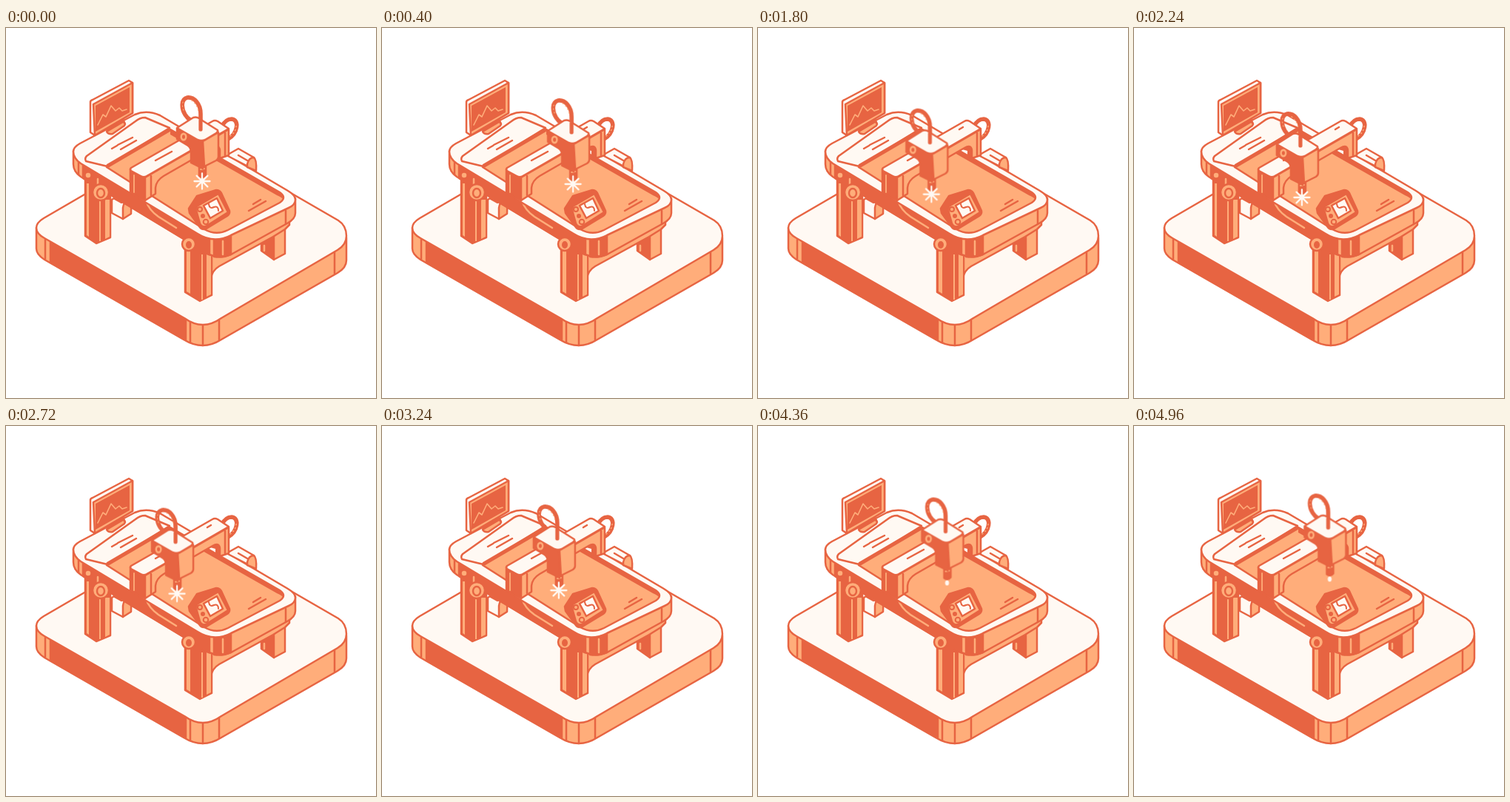
These frames come from a looping animation (500x500 px, 5000 ms). An HTML page:

```html
<!DOCTYPE html>
<html lang="en">
<head>
<meta charset="utf-8">
<title>Laser cutter</title>
<style>
  html, body { margin: 0; width: 100%; height: 100%; overflow: hidden; background: #fff; }
  svg { display: block; width: 100vw; height: 100vh; }
  path, circle, ellipse { stroke: #e76442; stroke-width: 2.5; stroke-linejoin: round; stroke-linecap: round; }
  .w { fill: #fff9f3; }
  .o { fill: #ffad7a; }
  .d { fill: #e76442; }
  .l { fill: none; }
  .lo { fill: none; stroke: #ffad7a; }
  .n { stroke: none; }
  .hose { fill: none; stroke-width: 5.6; }
  .rays { fill: none; stroke: #fff9f3; stroke-width: 2.3; }
  #head { animation: travel 5s linear infinite; }
  #spark { animation: flash .2s step-end infinite; }
  @keyframes travel {
    0%, 100% { transform: translate(0, 0); }
    46.667% { transform: translate(-39.7px, 22.9px); }
  }
  @keyframes flash {
    0% { opacity: 1; }
    80% { opacity: 0; }
  }
</style>
</head>
<body>
<svg viewBox="0 0 500 500">
  <g id="platform">
    <path class="o" d="M41 270V298Q41 306 52 313L240 421Q266 437 291 421L448 331Q460 324 460 314V283L266 200Z"/>
    <path class="d" d="M60 289L243 394V422L60 317Z"/>
    <path class="l" d="M53 286V312M249 397V425M266 402V429M288 395V422M444 303V332"/>
    <path class="w" d="M51 257L235 150Q246 143 257 149L449 260Q460 267 460 281Q460 293 448 300L291 392Q266 410 241 392L52 284Q41 278 41 270Q41 263 51 257Z"/>
  </g>

  <g id="legs">
    <path class="d" d="M345 286V301L362 313V270Z"/>
    <path class="o" d="M362 276L377 266V305L362 313Z"/>
    <path class="lo" d="M349 294V301" stroke-width="2"/>
    <path class="o" d="M270 306L383 258V266L377 272L361 282L288 322Q278 328 277 339Z"/>
    <path class="w" d="M143 232L152 226L165 232L158 258L143 250Z"/>
    <path class="o" d="M158 258V243Q159 234 166 233Q170 236 169 251Z"/>
    <path class="l" d="M147 231L156 236"/>
    <path class="d" d="M107 200V281L122 291L141 283V215Z"/>
    <path class="o n" d="M109 210H112V282L109 280ZM126 232H128V288H126ZM134 232H140V282L134 285Z"/>
    <path class="d" d="M242 286V357L262 369L278 361V296Z"/>
    <path class="o n" d="M244 300H249V359L244 356ZM264 306H266V367H264ZM271 306H277V360L271 363Z"/>
  </g>

  <g id="table">
    <path class="o" d="M91 166V184Q91 194 101 201L258 296Q281 316 306 305L380 264Q391 258 391 250V230L240 150Z"/>
    <path class="d" d="M104 184L259 278L275 285V306Q266 303 258 296L104 203Z"/>
    <path class="d" d="M281 287Q294 287 304 280V306Q293 311 281 309Z"/>
    <path class="l" d="M98 180V198M378 247V265"/>
    <path class="lo" d="M293 288V306M189 233Q193 246 206 255L230 270"/>
    <path class="w" d="M100 156L174 117Q190 110 208 118L381 220Q391 226 391 232Q391 239 382 243L304 280Q281 292 259 278L101 183Q91 176 91 167Q91 161 100 156Z"/>
    <path class="o" d="M136 188L222 137L370 222Q380 229 370 236L300 273Q284 281 268 272Z"/>
    <path class="d n" d="M222 136L370 222Q378 227 375 232Q373 229 366 226L222 144Z"/>
    <path class="w" d="M109 173L175 126Q181 121 188 121L221 135L137 187L108 180Q106 176 109 173Z"/>
    <path class="l" d="M138 186L220 138" stroke-width="2" style="stroke-width:5"/>
    <path class="l" d="M151 158L171 148M143 163L150 159M155 164L176 152M334 238L344 232M328 247L351 234"/>
    <circle class="o" cx="111" cy="199" r="4.5"/>
    <path class="lo" d="M124 204V212"/>
    <circle class="o" cx="128" cy="222" r="11"/>
    <ellipse class="o" cx="128" cy="223" rx="5" ry="6"/>
    <circle class="o" cx="247" cy="292" r="9"/>
    <ellipse class="d n" cx="247" cy="293" rx="4" ry="5"/>
  </g>

  <g id="monitor">
    <path class="d" d="M135 137L158 123L161 130L143 142Z"/>
    <path class="o" d="M136 140L158 127Q162 128 160 132L144 143Q138 144 136 140Z"/>
    <path class="w" d="M114 100Q114 98 117 97L166 71L171 74V115L120 145L114 141Z"/>
    <path class="o" d="M118 103L171 74V115L120 145Z"/>
    <path class="d n" d="M121 105L167 80V114L121 140Z"/>
    <path class="lo" d="M124 131L131 117L135 120L142 105L148 112L153 108L157 112L163 110" style="stroke-width:1.6"/>
  </g>

  <g id="motor">
    <path class="w" d="M298 172L314 163L335 175L327 187Z"/>
    <path class="o" d="M326 188V184Q328 175 335 175Q339 178 338 193Z"/>
    <path class="l" d="M314 172L326 179"/>
  </g>

  <path class="hose" d="M300 150C313 143 316 124 305 123C299 123 294 128 291 134"/>
  <path class="lo" d="M303 146Q311 140 311 132" stroke-dasharray="1 4" style="stroke-width:1.5"/>

  <g id="gantry">
    <path class="d" d="M168 191V222L188 233V202Z"/>
    <path class="lo" d="M173 199V222" style="stroke-width:1.8"/>
    <path class="o" d="M188 202L301 137V172L289 176V165Q288 157 279 162L213 200Q203 206 202 216V224L188 233Z"/>
    <path class="d n" d="M276 164Q287 157 289 164V176L283 174V166Z"/>
    <path class="w" d="M169 189L279 126Q282 124 286 126L301 136L192 199Q187 203 182 200L169 193Q167 191 169 189Z"/>
    <path class="l" d="M202 179L224 167M272 137L277 134M196 200V226M296 142V172"/>
  </g>

  <g id="handset">
    <path class="d" d="M247 244L258 227L284 219Q289 219 291 223L302 247Q303 251 299 254L271 271Q265 274 261 268L248 250Z"/>
    <path class="o" d="M258 241L287 224L300 249L270 268Q265 270 262 264L257 246Z"/>
    <path class="w" d="M267 240L285 230L293 247L276 257Z"/>
    <path class="l" d="M274 238Q275 245 281 242Q287 240 287 247" style="stroke-width:2"/>
    <circle class="o" cx="262" cy="245" r="3" style="stroke-width:2"/>
    <circle class="d n" cx="266" cy="254" r="3"/>
    <circle class="o" cx="270" cy="262" r="3.3" style="stroke-width:2"/>
  </g>

  <g id="head">
    <path class="hose" d="M263 137V116C263 102 254 93 245 94C236 96 237 109 242 117Q245 122 250 125"/>
    <path class="lo" d="M240 111Q237 104 240 98M251 98Q260 105 260 115" stroke-dasharray="1 4" style="stroke-width:1.2"/>
    <path class="d" d="M261 185H270V199Q266 204 261 200Z"/>
    <path class="lo" d="M263 191L268 190" style="stroke-width:1.8"/>
    <path class="d" d="M231 136V150L246 159Q250 162 250 168V182L266 190L268 150Z"/>
    <path class="o" d="M266 153L287 141V174Q287 177 284 179L268 187Z"/>
    <path class="w" d="M231 135L253 121Q256 120 259 121L286 138Q287 140 284 142L269 151Q264 153 259 151Z"/>
    <path class="l" d="M263 125V137" style="stroke-width:5.2"/>
    <ellipse class="o n" cx="240" cy="147" rx="4.5" ry="5.5"/>
    <ellipse class="d n" cx="240" cy="147" rx="2" ry="2.8"/>
    <ellipse class="w n" cx="265" cy="206.5" rx="2.6" ry="3.6"/>
    <path id="spark" class="rays" d="M265 196.5V217.5M254.5 207H275.5M257.6 199.6L272.4 214.4M272.4 199.6L257.6 214.4"/>
  </g>
</svg>
</body>
</html>
```
